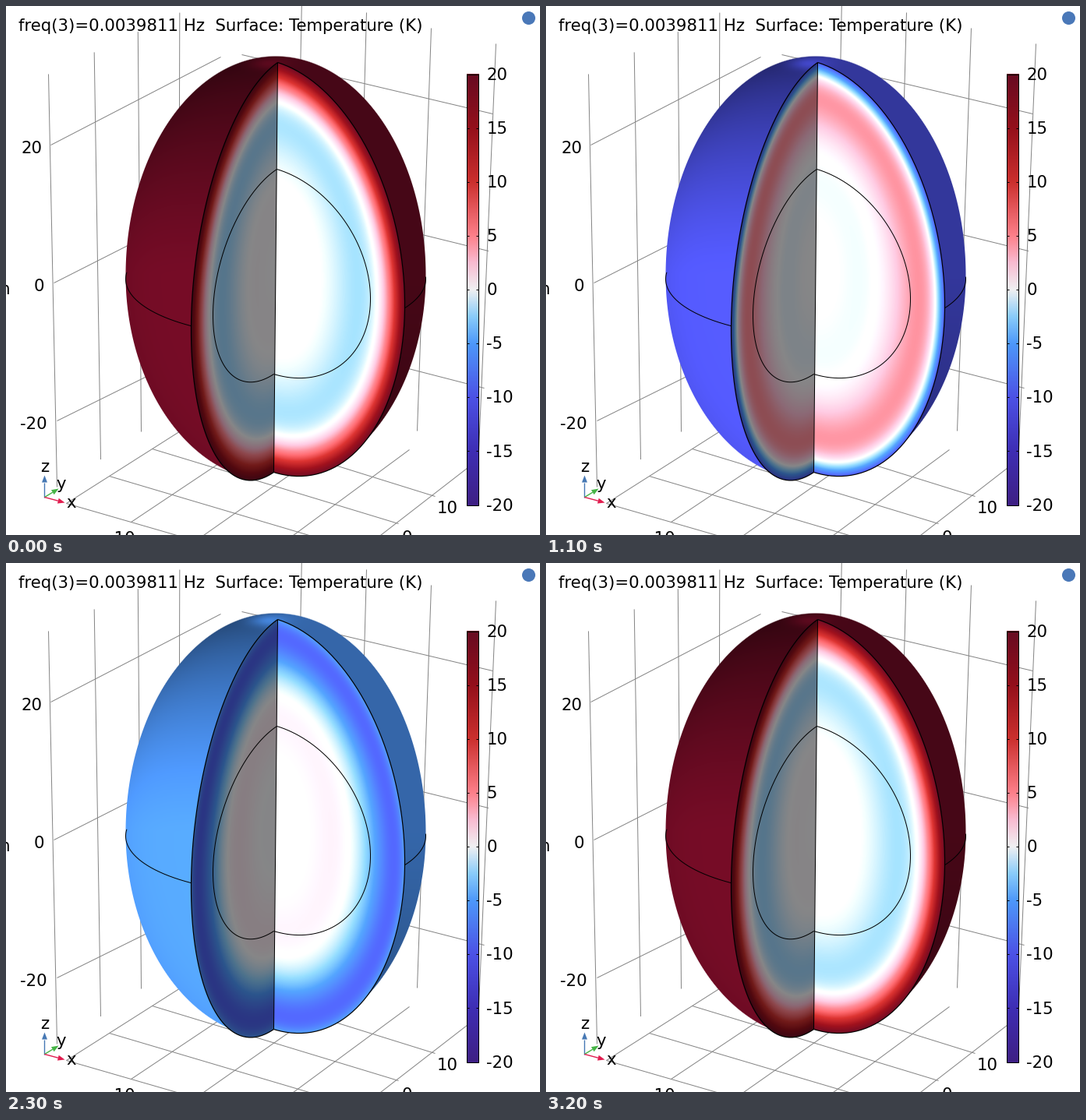
Animation, 685 px wide and 679 px high, one loop 3.3 s. Source, as a matplotlib script:

```python
import numpy as np
import matplotlib.pyplot as plt
from matplotlib.animation import FuncAnimation
from matplotlib.colors import LinearSegmentedColormap
from matplotlib.patches import Circle, Rectangle

W, H, DPI = 685, 679, 64
FRAMES, PERIOD, INTERVAL = 33, 32, 100
PX = 72 / DPI  # points per pixel
AMP, LAG = 20, 0.06

plt.rcParams["font.family"] = "DejaVu Sans"
fig = plt.figure(figsize=(W / DPI, H / DPI), dpi=DPI, facecolor="white")
ax = fig.add_axes([0, 0, 1, 1])

# Temperature colours, key points in kelvin
KEYS = {-20: "#3e2084", -15: "#3e2eb4", -10: "#4c52e6", -5: "#4e98fa",
        -2.5: "#8accfa", 0: "#f0f0f2", 2.5: "#f9bbd1", 5: "#fd808a",
        10: "#cb302e", 15: "#94101b", 20: "#680b22"}
HEAT = LinearSegmentedColormap.from_list(
    "heat", [((t + AMP) / (2 * AMP), c) for t, c in KEYS.items()], N=1024)


def vec(x, y):
    return np.array([x, y], float)


# Egg geometry: half ellipses spanned by an axis vector and a side vector
CENTER, AXIS = vec(345.5, 335), vec(2.5, -263)
YOLK, YOLK_AXIS = vec(345, 340.5), vec(2, -131.5)
RIGHT, YOLK_RIGHT = vec(165.5, 52), vec(122, 37)
LEFT, YOLK_LEFT = vec(-108.5, 75), vec(-80, 53)
OUTER, RX = vec(345.5, 345), 192.5


def arc(center, u, v, start=0, stop=np.pi):
    t = np.linspace(start, stop, 160)[:, None]
    return center + np.cos(t) * u + np.sin(t) * v


def face_coords(x, y, side):
    det = AXIS[0] * side[1] - AXIS[1] * side[0]
    dx, dy = x - CENTER[0], y - CENTER[1]
    return ((dx * side[1] - dy * side[0]) / det,
            (AXIS[0] * dy - AXIS[1] * dx) / det)


def wave(a, b):
    """Complex amplitude of the damped heat wave inside the egg."""
    s2 = a**2 + b**2
    depth = np.clip(1 - np.sqrt(s2), 0, 1)
    flank = b**2 / (s2 + 0.08)
    slow = 0.03 * np.logaddexp(0, (depth - 0.19) / 0.03)
    x = depth / (0.128 + 0.013 * flank) - 1.3 * slow * flank
    return AMP * np.exp(-(1 + 1j) * x) / np.sqrt(0.04 + 0.96 * s2)


X0, X1, Y0, Y1 = 148, 544, 58, 614
x, y = np.meshgrid(np.arange(X0, X1), np.arange(Y0, Y1))

nx = (x - OUTER[0]) / RX
ny = (y - OUTER[1]) / np.where(y < OUTER[1], 281, 265)
rho = np.hypot(nx, ny)
alpha = np.clip((1 - rho) * 200 + 0.5, 0, 1)
alpha[(x > 313) & (x < 450) & (y > 560)] = 0

# Outer shell: bright on the left, dim on the right, a glint at the top
bright = 1.14 - 0.6 * np.maximum(-ny, 0)**1.3 - 0.08 * np.minimum(rho, 1)**10
dim = 0.68 - 0.14 * np.maximum(ny, 0)
mix = np.clip((nx + 0.15) / 0.3, 0, 1)
mix = mix * mix * (3 - 2 * mix)
shade = bright * (1 - mix) + dim * mix
shade += 0.33 * np.exp(-((x - 335) / 24)**2 - ((y - 73) / 8)**2)
amp = np.full(x.shape, AMP, dtype=complex)

for side, light in ((LEFT, 0.56), (RIGHT, 1.09)):
    a, b = face_coords(x, y, side)
    inside = (b >= 0) & (np.hypot(a, b) <= 1)
    amp[inside] = wave(a, b)[inside]
    shade[inside] = light
    alpha[inside] = 1


def egg(i):
    temp = (amp * np.exp(1j * (2 * np.pi * i / PERIOD - LAG))).real
    rgb = HEAT((temp + AMP) / (2 * AMP))[..., :3]
    return np.dstack([np.clip(rgb * shade[..., None], 0, 1), alpha])


def line(points, color="black", width=1, z=4):
    px, py = np.transpose(points)
    ax.plot(px, py, color=color, lw=width * PX, zorder=z,
            solid_capstyle="butt")


def grid(start, end):
    line([start, end], "#858585", 1, 1)


def label(px, middle, text, align="left"):
    ax.text(px, middle + 7.2, text, fontsize=21.2 * PX, ha=align,
            va="baseline", color="black", zorder=6)


# Walls
for k in range(4):
    grid((54 + 60 * k - 1.3 * k**2, 87 - 29 * k + 0.9 * k**2),
         (65 + 58 * k - 2 * k**2, 617 - 35.5 * k))
    grid((628 - 83 * k, 48 - 20 * k), (606 - 79 * k, 570 - 25 * k))
for k in range(3):
    grid((57 + 4 * k, 178 + 177 * k), (275 + 3 * k, 65 + 180 * k))
    grid((302, 62 + 174 * k), (624 - 5.5 * k, 138 + 176 * k))

# Floor
near, far = vec(77, 638), vec(280, 509)
for k in range(5):
    grid(near + k * vec(83, 24), far + k * vec(79, 20))
for k in range(4):
    grid(near + k * vec(55, -35), vec(409, 734) + k * vec(47, -35))

picture = ax.imshow(egg(0), extent=(X0 - 0.5, X1 - 0.5, Y1 - 0.5, Y0 - 0.5),
                    interpolation="nearest", aspect="auto", zorder=3)

# Edges of the cut, the yolk and the equator
for side, yolk_side in ((LEFT, YOLK_LEFT), (RIGHT, YOLK_RIGHT)):
    line(arc(CENTER, AXIS, side), width=1.2)
    line(arc(YOLK, YOLK_AXIS, yolk_side))
line([CENTER + AXIS, CENTER - AXIS])
equator = vec(345.5, 350), vec(RX, 0), vec(0, 72.8)
line(arc(*equator, np.arccos(LEFT[0] / RX), np.pi + 0.12))
line(arc(*equator, -0.04, np.arccos(RIGHT[0] / RX)))

# Colour bar
ax.imshow(np.linspace(1, 0, 554)[:, None], cmap=HEAT, vmin=0, vmax=1,
          extent=(590.5, 606.5, 640.5, 86.5), aspect="auto",
          interpolation="nearest", zorder=5)
ax.add_patch(Rectangle((591, 87), 15, 553, fill=False, ec="black",
                       lw=PX, zorder=6))
for value in range(20, -21, -5):
    ty = 363.5 - value * 553 / 40
    line([(591, ty), (594, ty)], z=6)
    line([(603, ty), (606, ty)], z=6)
    label(616, ty, str(value))

# Axis labels and title
label(16, 24.5, "freq(3)=0.0039811 Hz  Surface: Temperature (K)")
for k in range(3):
    label(46 + 3 * k, 181 + 177 * k, str(20 - 20 * k), "right")
label(4, 362, "m", "right")
label(552, 643, "10")
label(507, 681, "0")
label(131, 682, "-10")

# Orientation triad
start = vec(49, 630)
for tip, color, name, pos in [
        (vec(49, 602), "#4678b4", "z", (49, 590)),
        (vec(67, 619), "#46b446", "y", (70, 612)),
        (vec(75, 637), "#e11e50", "x", (83, 636))]:
    d = (tip - start) / np.hypot(*(tip - start))
    n, base = vec(-d[1], d[0]), tip - 9 * d
    line([start, base], color, 1.4, 5)
    ax.fill(*np.transpose([tip, base + 3.5 * n, base - 3.5 * n]),
            color=color, lw=0, zorder=5)
    label(*pos, name, "center")

ax.add_patch(Circle((670, 15), 8.5, color="#4a78b8", lw=0, zorder=6))

ax.set_xlim(-0.5, W - 0.5)
ax.set_ylim(H - 0.5, -0.5)
ax.axis("off")


def update(i):
    picture.set_data(egg(i))
    return [picture]


anim = FuncAnimation(fig, update, frames=FRAMES, interval=INTERVAL,
                     repeat=True, repeat_delay=0, blit=False)
plt.show()
```
